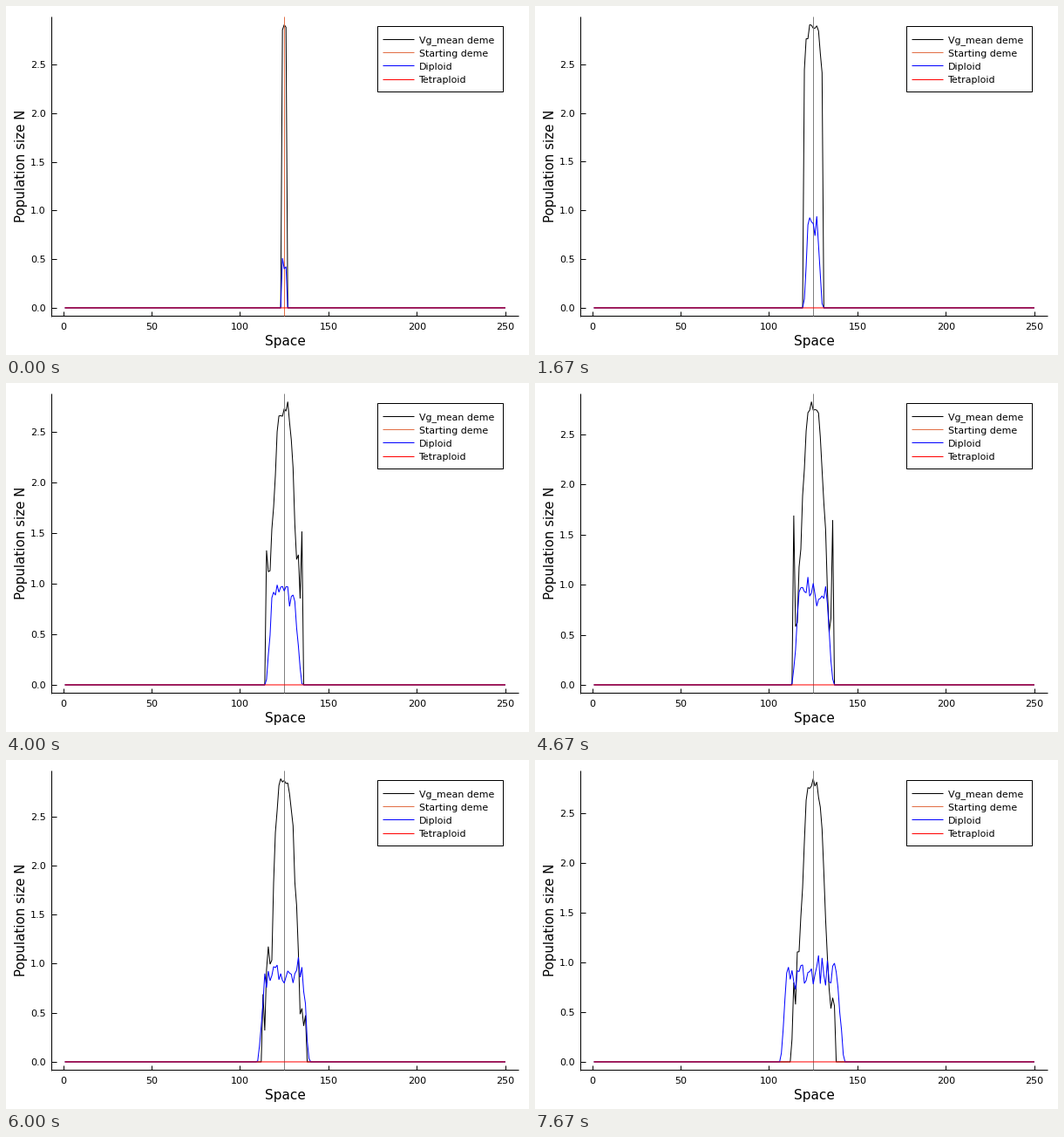
A matplotlib script for the animation above (8 s loop, 600 px wide and 400 px high).

```python
import numpy as np
import matplotlib.pyplot as plt
from matplotlib.animation import FuncAnimation
from matplotlib.patches import Rectangle

WIDTH, HEIGHT, DPI = 600, 400, 100
LEFT, RIGHT, TOP, BOTTOM = 52.4, 588, 11.7, 355.7
LOOP_MS, TICK_MS, STEPS = 8000, 40, 24
PX = 72 / DPI
CENTER = 125
DEMES = np.arange(1, 251)
OFFSET = np.abs(DEMES - CENTER)
ORANGE = "#e26f46"

plt.rcParams["font.family"] = "DejaVu Sans"


def vg_mean(step, rng):
    """Dome around the start, cut off at a slowing front with founder spikes."""
    front = round(2 + 11.3 * (1 - (1 - step / 23) ** 2))
    dome = 1 / (1 + (OFFSET / 7) ** 4)
    spike = 1.2 * np.exp(-((step - 13) / 5) ** 2)
    values = 2.82 * dome + spike * np.exp(-2.0 * np.abs(front - 1 - OFFSET))
    values += rng.normal(0, 1, len(DEMES)) * (.04 + .2 * (1 - dome))
    values = np.where(OFFSET < front, np.maximum(values, 0), 0)
    peak = np.interp(step, [0, 5, 12, 18, 23], [2.91, 2.905, 2.80, 2.885, 2.846])
    return values * peak / values.max()


def diploid(step, rng):
    """Noisy plateau that widens steadily, with ramps at both ends."""
    grown = step / 23
    inside = np.minimum(DEMES - (123 - 17 * grown), 127 + 16 * grown - DEMES)
    ramp = np.clip(inside / min(1 + step / 2, 5), 0, 1)
    height = .9 - .45 * np.exp(-step / 2)
    noise = rng.normal(1, .1, len(DEMES))
    return height * noise * ramp ** 2 * (3 - 2 * ramp)


def x_px(deme):
    pad = .03 * 249
    return LEFT + (deme - 1 + pad) / (249 + 2 * pad) * (RIGHT - LEFT)


def y_px(value, peak):
    span = (BOTTOM - TOP) / 1.06
    return BOTTOM - .03 * span - np.asarray(value) / peak * span


fig = plt.figure(figsize=(WIDTH / DPI, HEIGHT / DPI), dpi=DPI, facecolor="white")
ax = fig.add_axes([0, 0, 1, 1])
ax.set(xlim=(0, WIDTH), ylim=(HEIGHT, 0))
ax.axis("off")


def line(xs, ys, color="black", **kw):
    return ax.plot(xs, ys, color=color, lw=PX, solid_joinstyle="miter",
                   solid_capstyle="butt", **kw)[0]


def label(x, y, text, size=8, ha="center", va="baseline", **kw):
    return ax.text(x, y, text, fontsize=size, ha=ha, va=va, **kw)


# Axes
line([52, 52], [12, 356])
line([52, RIGHT], [355, 355])
for deme in range(0, 251, 50):
    line([x_px(deme)] * 2, [355, 350])
    label(x_px(deme), 370.6, deme)
label(320.3, 388.6, "Space", 11)
label(17.2, 183.6, "Population size N", 10.8, va="center", rotation=90)

levels = np.arange(0, 2.6, .5)
ticks = [line([52, 58], [0, 0]) for _ in levels]
tick_labels = [label(45.6, 0, f"{v:.1f}", ha="right") for v in levels]

# Curves
vg_line = line([], [])
start_line = line([x_px(CENTER)] * 2, [12, 355])
diploid_line = line([], [], "blue")
line(x_px(DEMES), y_px(0 * DEMES, 1), "red", snap=False)

# Legend
ax.add_patch(Rectangle((426, 23), 144, 75, fc="white", ec="black", lw=PX, zorder=3))
entries = [("Vg_mean deme", "black"), ("Starting deme", ORANGE),
           ("Diploid", "blue"), ("Tetraploid", "red")]
for row, (name, color) in enumerate(entries):
    y = 38.2 + 15.1 * row
    line([432, 468], [y, y], color, zorder=4)
    label(473.5, y + 4.2, name, 7.9, ha="left", zorder=4)


def update(frame):
    # Steps change at the tick nearest before each third of a second
    step = (frame * TICK_MS + 30) * STEPS // LOOP_MS
    rng = np.random.default_rng(step)
    vg = vg_mean(step, rng)
    peak = vg.max()
    vg_line.set_data(x_px(DEMES), y_px(vg, peak))
    diploid_line.set_data(x_px(DEMES), y_px(diploid(step, rng), peak))
    start_line.set_color(ORANGE if step == 0 else "gray")
    for value, tick, text in zip(levels, ticks, tick_labels):
        y = float(y_px(value, peak))
        tick.set_ydata([y, y])
        text.set_y(y + 4)
    return [vg_line, diploid_line, start_line, *ticks, *tick_labels]


anim = FuncAnimation(fig, update, frames=LOOP_MS // TICK_MS, interval=TICK_MS,
                     repeat=True, repeat_delay=0, blit=False)
plt.show()
```
